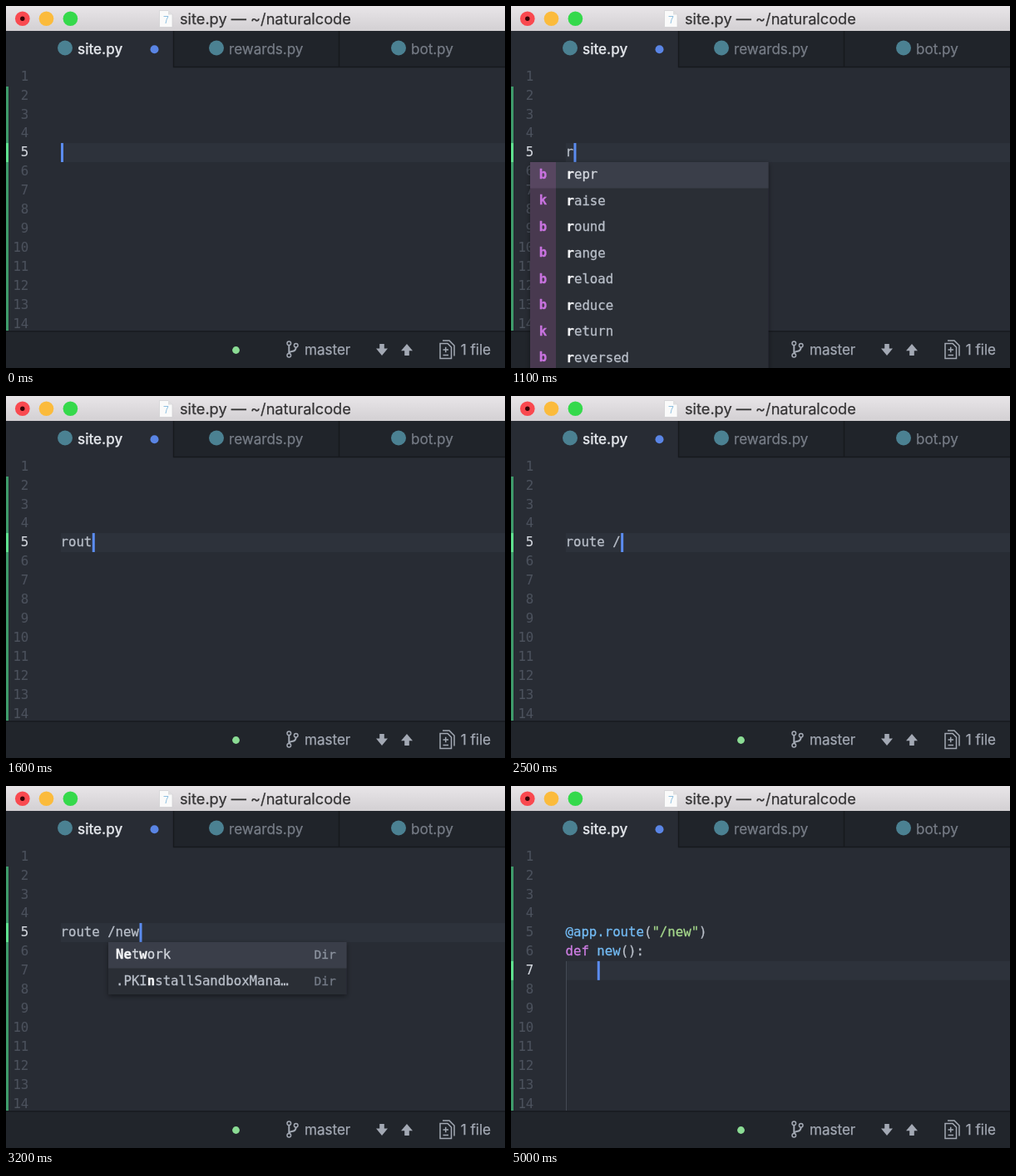
Animation, 600 px wide and 436 px high, one loop 5.1 s. Source, as an HTML page:

```html
<!DOCTYPE html>
<html lang="en">
<head>
<meta charset="utf-8">
<title>Editor</title>
<style>
html, body { margin: 0; width: 100%; height: 100%; overflow: hidden; background: #282c34; }
svg { display: block; width: 100vw; height: 100vh; }
text { white-space: pre; }
text, tspan { fill: currentColor; stroke: currentColor; }
.ui { font: 17.05px Inter, sans-serif; color: #a3a9b4; stroke-width: .25; }
.tab { color: #777d87; }
.active { color: #e2e5ea; font-weight: 500; }
.title { font-size: 18.2px; color: #353435; }
.code { font: 15.7px "DejaVu Sans Mono", monospace; color: #b9bfc9; stroke-width: .3; }
.num { text-anchor: end; color: #4c525d; stroke-width: .1; }
.on { color: #d3d7de; }
.b { font-weight: bold; color: #f4f5f7; }
.fn { color: #73bbf4; }
.str { color: #a4d78b; }
.kw { color: #cf7ee4; }
.icon { font-weight: bold; color: #c873df; text-anchor: middle; }
.dir { font-size: 14.6px; color: #747b87; }
.dir.on { color: #8d94a0; }
</style>
</head>
<body>
<svg viewBox="0 0 600 436" preserveAspectRatio="none">
  <defs>
    <linearGradient id="bar" x2="0" y2="1">
      <stop stop-color="#e8e5e8"/><stop offset="1" stop-color="#d3d0d3"/>
    </linearGradient>
    <filter id="shadow" x="-10%" y="-10%" width="120%" height="130%">
      <feDropShadow dx="0" dy="2" stdDeviation="3" flood-opacity=".45"/>
    </filter>
  </defs>
  <rect width="600" height="436" fill="#282c34"/>

  <rect width="600" height="30" fill="url(#bar)"/>
  <circle cx="19.800" cy="15.300" r="8.800" fill="#f9494f"/>
  <circle cx="48.500" cy="15.300" r="8.800" fill="#fbbb3c"/>
  <circle cx="77.400" cy="15.300" r="8.800" fill="#35d94b"/>
  <circle cx="19.800" cy="15.300" r="2.700" fill="#3a0507"/>
  <path d="M184.500 5.500h10.500l5 5v15h-15.500z" fill="#fafafa" stroke="#cfcfd1" stroke-width=".7"/>
  <path d="M195 5.500v5h5z" fill="#dedee0"/>
  <path d="M189.500 12.500h5.500q-2.500 4-3 8.500" fill="none" stroke="#8fbfe0"/>
  <text class="ui title" x="209" y="21.700">site.py — ~/naturalcode</text>

  <rect y="30" width="600" height="44" fill="#20242a"/>
  <path d="M201 73.500H600M201.500 30V74M400.500 30V74" stroke="#16191d" stroke-width="1.500"/>
  <rect y="30" width="200.700" height="44" fill="#282c34"/>
  <g fill="#4b8192">
    <circle cx="71" cy="50.500" r="9"/><circle cx="253" cy="50.500" r="9"/><circle cx="472" cy="50.500" r="9"/>
  </g>
  <text class="ui active" x="86" y="58">site.py</text>
  <circle cx="178.500" cy="52.300" r="5" fill="#5a85e5"/>
  <text class="ui tab" x="268" y="58">rewards.py</text>
  <text class="ui tab" x="487" y="58">bot.py</text>

  <rect y="97" width="3" height="295" fill="#3f9b6b"/>
  <g id="editor"></g>

  <rect y="391" width="600" height="45" fill="#21252b"/>
  <rect y="391" width="600" height="1.500" fill="#181b20"/>
  <circle cx="276.500" cy="414.500" r="4.400" fill="#8bdc94"/>
  <g fill="none" stroke="#a3a9b4" stroke-width="1.500">
    <circle cx="340.300" cy="406.300" r="2.300"/>
    <circle cx="340.300" cy="420.700" r="2.300"/>
    <circle cx="348.700" cy="408.800" r="2.300"/>
    <path d="M340.300 408.500v10M348.700 411q0 4.500-5 5-3 .5-3.400 2.500" stroke-width="2"/>
    <path d="M522 406.500h9l4.500 4.500v13.500h-13.500zM525 403h8l6 6v12.500"/>
    <path d="M525.500 414h6.500M528.700 410.700v6.500M525.500 420.500h6.500"/>
  </g>
  <g fill="#a3a9b4">
    <path transform="translate(445 402.700) scale(1.4)" d="M7 7V3H3v4H0l5 6 5-6z"/>
    <path transform="translate(475 402.700) scale(1.4)" d="M5 3L0 9h3v4h4V9h3z"/>
  </g>
  <text class="ui" x="359" y="420">master</text>
  <text class="ui" x="546.800" y="420">1 file</text>
  <g id="popup"></g>
</svg>
<script>
const LOOP = 5100, STEP = 100;
const LEFT = 66, CHAR = 9.45, LINE = 22.92, ROW = 31.5, TOP = 188;
const editor = document.getElementById('editor');
const popup = document.getElementById('popup');

// [start time, typed text]
const typing = [
  [0, ''], [1000, 'r'], [1200, 'ro'], [1400, 'rou'], [1500, 'rout'],
  [2200, 'route'], [2300, 'route '], [2500, 'route /'],
  [2900, 'route /n'], [3100, 'route /ne'], [3200, 'route /new'], [3700, null]
];

const words = s => s.split(' ').map(w => w.split(':'));
const paths = [['', 'Network'], ['', '.PKInstallSandboxMana…']];

// [start time, x, query, items]
const menus = [
  [0],
  [1100, 23, 'r', words('b:repr k:raise b:round b:range b:reload b:reduce k:return b:reversed')],
  [1300, 23, 'ro', words('b:round b:reload')],
  [1400, 23, 'rou', words('b:round')],
  [1600],
  [3000, 89, 'n', words('b:next k:not b:min b:len b:int k:in k:and b:range')],
  [3100, 123, 'ne', paths],
  [3200, 123, 'new', paths],
  [3600]
];

const fades = [100, 900, 4500];
const fadeLevels = [.65, .25, 0, 0, .55];

const at = (list, t) => list.filter(e => e[0] <= t).pop();
const rect = (x, y, w, h, fill, more = '') =>
  `<rect x="${x}" y="${y}" width="${w}" height="${h}" fill="${fill}" ${more}/>`;
const text = (x, y, body, cls = '') => `<text class="code ${cls}" x="${x}" y="${y}">${body}</text>`;
const span = (cls, s) => `<tspan class="${cls}">${s}</tspan>`;
const baseline = n => 89.7 + (n - 1) * LINE;

function cursorAlpha(t, typed) {
  if (typed) return 1;
  const start = fades.filter(f => f <= t).pop();
  return fadeLevels[(t - start) / STEP] ?? 1;
}

function drawEditor(t) {
  const typed = at(typing, t)[1];
  const done = typed === null;
  const line = done ? 7 : 5;
  const col = done ? 4 : typed.length;
  const y = 73.4 + (line - 1) * LINE;
  let out = rect(LEFT, y, 600 - LEFT, LINE, '#2d323b') + rect(0, y, 3, LINE, '#5fe08e');
  for (let n = 1; n <= 14; n++) out += text(27.3, baseline(n), n, n === line ? 'num on' : 'num');
  if (done) {
    out += rect(LEFT, y, 1, 391 - y, '#444a54');
    out += text(65.5, baseline(5), span('fn', '@app.route') + '(' + span('str', '"/new"') + ')');
    out += text(65.5, baseline(6), span('kw', 'def') + ' ' + span('fn', 'new') + '():');
  } else {
    out += text(65.5, baseline(5), typed);
  }
  const x = LEFT + col * CHAR;
  return out + rect(x, y, 3, LINE, '#5b8cf0', `opacity="${cursorAlpha(t, typed)}"`);
}

// Bold the letters of the query in the order they occur.
function highlight(word, query) {
  let i = 0;
  return [...word].map(c => {
    if (c.toLowerCase() !== query[i]) return c;
    i++;
    return span('b', c);
  }).join('');
}

function drawMenu(t) {
  const [, x, query, items] = at(menus, t);
  if (!items) return '';
  const width = 286.5, height = items.length * ROW;
  const icons = items[0][0] !== '';
  let out = rect(x, TOP, width, height, '#2a2e36', 'filter="url(#shadow)"');
  out += rect(x, TOP, width, ROW, '#3a3e49');
  if (icons) out += rect(x, TOP, 31, height, '#48394f') + rect(x, TOP, 31, ROW, '#574660');
  items.forEach(([kind, word], i) => {
    const y = TOP + i * ROW + 20.4;
    const state = i ? '' : 'on';
    out += text(x + (icons ? 43.5 : 9), y, highlight(word, query), state);
    out += icons ? text(x + 15.5, y - .6, kind, 'icon') : text(x + 247.5, y, 'Dir', 'dir ' + state);
  });
  return out;
}

let last = -1;
function frame(now) {
  const t = Math.floor(now % LOOP / STEP) * STEP;
  if (t !== last) {
    last = t;
    editor.innerHTML = drawEditor(t);
    popup.innerHTML = drawMenu(t);
  }
  requestAnimationFrame(frame);
}
frame(0);
</script>
</body>
</html>
```
